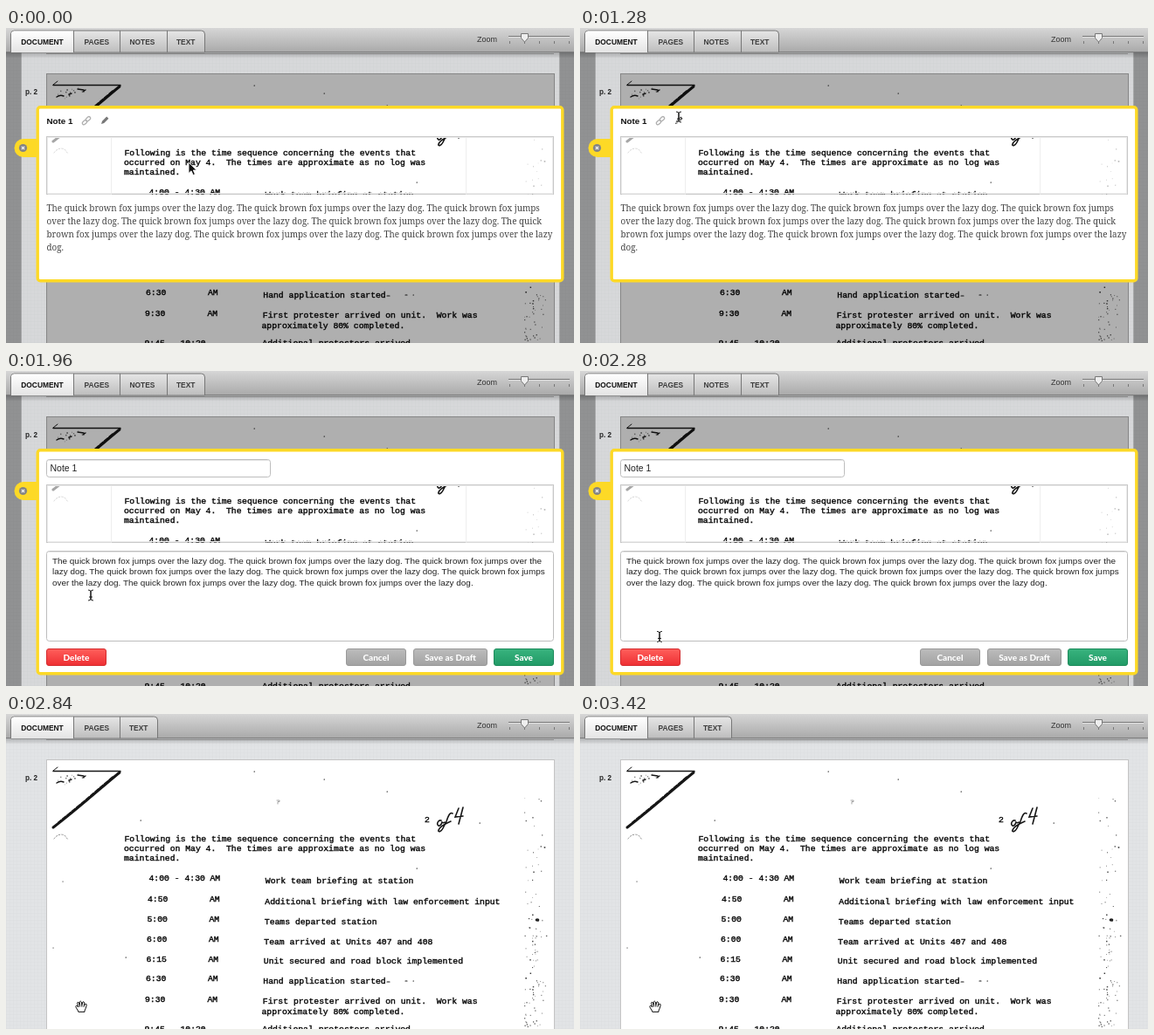
Animation, 650 px wide and 361 px high, one loop 3.44 s. Source, as an HTML page:

```html
<!DOCTYPE html>
<html lang="en">
<head>
<meta charset="utf-8">
<title>Note editor</title>
<style>
html, body { margin: 0; width: 100%; height: 100%; overflow: hidden; background: #e2e4e6; }
svg { display: block; width: 650px; height: 361px; }
text { white-space: pre; font-family: "Liberation Sans", Arial, sans-serif; }
.type text { font: 9.75px "Liberation Mono", monospace; fill: #0c0c0c; stroke: #0c0c0c; stroke-width: .42px; }
.tab { font-size: 8.4px; font-weight: 700; fill: #3c3c3c; }
.serif text { font: 9.9px "Noto Serif", serif; fill: #444; }
.field text { font-size: 9.93px; fill: #222; }
.btn text { font: 800 10px Lato, sans-serif; fill: #fff; text-anchor: middle; }
</style>
</head>
<body>
<svg id="stage" viewBox="0 0 650 361" xmlns="http://www.w3.org/2000/svg">
  <defs>
    <linearGradient id="bar" x2="0" y2="1"><stop stop-color="#d6d6d6"/><stop offset="1" stop-color="#a9a9a9"/></linearGradient>
    <linearGradient id="tabOff" x2="0" y2="1"><stop stop-color="#e6e6e6"/><stop offset="1" stop-color="#bdbdbd"/></linearGradient>
    <linearGradient id="tabOn" x2="0" y2="1"><stop stop-color="#fff"/><stop offset="1" stop-color="#e4e4e4"/></linearGradient>
    <linearGradient id="fall" x2="0" y2="1"><stop stop-color="#000" stop-opacity=".22"/><stop offset="1" stop-color="#000" stop-opacity="0"/></linearGradient>
    <linearGradient id="red" x2="0" y2="1"><stop stop-color="#ff5f5b"/><stop offset="1" stop-color="#ee2f33"/></linearGradient>
    <linearGradient id="grey" x2="0" y2="1"><stop stop-color="#bcbcbc"/><stop offset="1" stop-color="#a2a2a2"/></linearGradient>
    <linearGradient id="green" x2="0" y2="1"><stop stop-color="#38b37e"/><stop offset="1" stop-color="#219a66"/></linearGradient>
    <pattern id="linen" width="4" height="4" patternUnits="userSpaceOnUse"><path d="M0 .5H4M.5 0V4" stroke="#000" stroke-opacity=".012"/></pattern>
    <clipPath id="crop"><rect x="48" y="126" width="578" height="64.5"/></clipPath>
    <g id="ink">
      <g fill="none" stroke="#161616" stroke-linecap="round">
        <path d="M54 65.5H131" stroke-width="1.4"/>
        <path d="M130 67C108 85 84 107 54 130" stroke-width="3"/>
        <path d="M122 72C100 91 80 108 60 124" stroke-width="1.6" stroke-dasharray="5 2"/>
        <path d="M54 65l5-4" stroke-width="1"/>
        <path d="M58 79q4-3 8-1M82 70l7 1M72 76l3-1M88 73l3-2" stroke-width="1.4"/>
        <path d="M55 143q5-7 12-4l4 5" stroke="#777" stroke-width=".8" stroke-dasharray="1.5 2"/>
        <path d="M498 122c-3-1-5 3-4 5s4 1 5-3c1 1 2 1 3 0M511 114c-3-2-5 3-7 9l-4 8c-2 4-6 5-5 2 1-3 7-7 14-10M518 108l-4 10 9-1M523 107l-5 19" stroke-width="1.6"/>
        <path d="M310 99h3v1.5h-2v2.5" stroke="#999" stroke-width=".9"/>
        <path d="M284 66h.5M364 75h.5M436 307h3M457 306h2M466 306h.5M154 122h.5M436 89h.5M542 125h.5M470 177h.5M137 279h.5M65 192h.1M54 268h.1" stroke-width="1.1"/>
      </g>
      <ellipse cx="608" cy="236" rx="2.4" ry="1.7" fill="#222"/>
      <g id="specks" fill="#333"></g>
      <g id="typed" class="type"></g>
    </g>
  </defs>

  <rect width="650" height="361" fill="#e2e4e6"/>
  <rect width="650" height="361" fill="url(#linen)"/>
  <path d="M46 29.5H627" stroke="#aaa"/>
  <rect x="46.5" y="52.5" width="581" height="320" fill="#fff" stroke="#c4c4c4"/>
  <use href="#ink"/>
  <g id="dim">
    <path d="M0 28H17V361H0ZM634 28H650V361H634Z" fill="#000" fill-opacity=".36"/>
    <path d="M17 28H634V361H17Z" fill="#000" fill-opacity=".05"/>
    <rect x="46" y="52" width="582" height="310" fill="#000" fill-opacity=".28"/>
    <path d="M17.5 28V361M633.5 28V361" stroke="#777" stroke-opacity=".5"/>
  </g>
  <text x="22" y="76" font-size="8.2" font-weight="700" fill="#222">p. 2</text>

  <rect y="28" width="650" height="7" fill="url(#fall)"/>
  <rect width="650" height="28" fill="url(#bar)"/>
  <path d="M0 27.5H650" stroke="#7d7d7d"/>
  <g id="tabs"></g>
  <text x="539" y="16" font-size="9" fill="#333">Zoom</text>
  <path d="M575 9.5H645" stroke="#777"/>
  <path d="M575 10.5H645" stroke="#e2e2e2"/>
  <path d="M576.5 15v3M593.5 15v3M610.5 15v3M627.5 15v3M644.5 15v3" stroke="#777"/>
  <path d="M589.5 6.5h8v5l-4 4.5-4-4.5Z" fill="#eee" stroke="#777"/>

  <g id="note">
    <path d="M36 127H20a10.5 10.5 0 0 0 0 21H36Z" fill="#fdd926"/>
    <circle cx="19.5" cy="137.5" r="4.6" fill="#858585"/>
    <path d="M17.8 135.8l3.4 3.4M21.2 135.8l-3.4 3.4" stroke="#fff" stroke-width="1.1"/>
    <rect id="frame" x="36.2" y="90.8" width="600.6" height="199" rx="3" fill="#fff" stroke="#fdd926" stroke-width="3.4"/>
    <g id="excerpt">
      <rect x="46.5" y="124.5" width="580" height="66" fill="#fff" stroke="#c8c8c8"/>
      <g clip-path="url(#crop)">
        <use href="#ink"/>
        <path d="M48 126H121V191H48ZM526 126H626V191H526Z" fill="#fff" fill-opacity=".62"/>
        <path d="M120.5 126V191M526.5 126V191" stroke="#eee"/>
      </g>
      <rect x="47.5" y="125.5" width="578" height="64" fill="none" stroke="#ececec"/>
    </g>
    <g id="view">
      <text x="46.5" y="110" font-size="9.8" font-weight="700" fill="#111">Note 1</text>
      <g fill="none" stroke="#b0b0b0" stroke-width="1.3">
        <rect x="-3" y="-1.8" width="6" height="3.6" rx="1.8" transform="translate(90 108.2) rotate(-42)"/>
        <rect x="-3" y="-1.8" width="6" height="3.6" rx="1.8" transform="translate(94 104.2) rotate(-42)"/>
      </g>
      <path id="pencil" d="M109 110l1-3.2 5.2-5.2 2.2 2.2-5.2 5.2Z"/>
      <g id="body" class="serif"></g>
    </g>
    <g id="edit">
      <g fill="#fff" stroke="#bdbdbd">
        <rect x="46.5" y="101.5" width="256" height="20" rx="3"/>
        <rect x="46.5" y="206.5" width="580" height="103" rx="3"/>
      </g>
      <path d="M48 102.5H301M48 207.5H625" stroke="#e6e6e6"/>
      <text x="50.5" y="115" font-size="10.5" fill="#222">Note 1</text>
      <g id="area" class="field"></g>
      <path id="caret" d="M537.5 237V248" stroke="#111"/>
      <g id="buttons" class="btn"></g>
    </g>
  </g>

  <g id="cursor" stroke-linejoin="round">
    <path id="arrow" d="M0 0V12.5L3 9.8 5.2 14.6 7.4 13.6 5.3 9H9.3Z" fill="#111" stroke="#fff" stroke-width=".9"/>
    <g id="beam" fill="none" stroke-linecap="round">
      <path d="M-2.5-6Q0-6 0-4V4Q0 6-2.5 6M2.5-6Q0-6 0-4V4Q0 6 2.5 6M-1.5 2H1.5" stroke="#fff" stroke-width="2.4"/>
      <path d="M-2.5-6Q0-6 0-4V4Q0 6-2.5 6M2.5-6Q0-6 0-4V4Q0 6 2.5 6M-1.5 2H1.5" stroke="#111" stroke-width="1"/>
    </g>
    <path id="point" d="M-1.3.8Q0-1 1.3.8V5Q2.5 4 3.6 5.4 5 4.6 5.8 6 7.4 5.6 7.6 7.4V10Q7 12 6.2 14H-.2Q-1.6 11.4-4.4 8.8-4.6 6.4-2.6 7.2L-1.3 8.4ZM1.3 5V8M3.6 5.6V8.2M5.8 6.2V8.6" fill="#fff" stroke="#111"/>
    <path id="palm" d="M-3.6 5Q-5 3-6.2.6-6.2-1.4-4.4-.4L-3.2 1-4.5-3.6Q-4.2-5.4-2.8-4.4L-1.6-1.2-1.8-5Q-.6-6.8.4-5L.8-1.2 1.8-4.8Q3.2-6 3.9-4.2L3.3-.6 4.8-2.6Q6.4-3.2 6.2-1.2 5.4 2.4 4 5V6.4H-3.2ZM-1.6-1.2V.6M.8-1.2V.6M3.3-.6L3 .8" fill="#fff" stroke="#111"/>
  </g>
</svg>
<script>
const NS = "http://www.w3.org/2000/svg";
const $ = id => document.getElementById(id);
const LOOP = 3440, OPEN = 1300, REMOVE = 2740;

function add(parent, tag, attrs, label) {
  const el = document.createElementNS(NS, tag);
  for (const k in attrs) el.setAttribute(k, attrs[k]);
  if (label) el.textContent = label;
  return parent.appendChild(el);
}
const show = (id, on) => $(id).setAttribute("visibility", on ? "inherit" : "hidden");

// Typewritten page
const typed = (x, y, s) => add($("typed"), "text", { x, y }, s);
typed(135.5, 145.5, "Following is the time sequence concerning the events that");
typed(135, 157, "occurred on May 4.  The times are approximate as no log was");
typed(135, 167.5, "maintained.");
typed(479, 124, "2");
[
  [163.5, 191, "4:00 - 4:30", "Work team briefing at station"],
  [162, 215, "4:50", "Additional briefing with law enforcement input"],
  [161.5, 238, "5:00", "Teams departed station"],
  [161, 261, "6:00", "Team arrived at Units 407 and 408"],
  [160.5, 283.5, "6:15", "Unit secured and road block implemented"],
  [160, 306, "6:30", "Hand application started"],
  [159, 329.5, "9:30", "First protester arrived on unit.  Work was"],
  [158.5, 363.5, "9:45 - 10:20", "Additional protesters arrived"]
].forEach(([x, y, time, what], i) => {
  typed(x, y, time);
  if (i < 7) typed(233.5 - i * .5, y, "AM");
  typed(296.8 - i * .5, y + (i < 7 ? 2.6 : 0), what);
});
typed(292.5, 343.5, "approximately 80% completed.");

// Copier specks, mostly down the right margin
let seed = 11;
const rnd = () => (seed = seed * 16807 % 2147483647) / 2147483647;
for (let i = 0; i < 120; i++) {
  const side = rnd() < .85;
  const x = side ? (rnd() < .5 ? 593 : 602) + rnd() ** 2 * 16 : 56 + rnd() * 34;
  const y = side ? 58 + Math.sqrt(rnd()) * 300 : 68 + rnd() * 14;
  const w = .6 + rnd();
  add($("specks"), "rect", { x, y, width: w, height: w, opacity: .5 + rnd() * .5 });
}

// Tab strip, rebuilt only when the set of tabs changes
let tabKey;
function drawTabs(full) {
  if (tabKey === full) return;
  tabKey = full;
  const box = $("tabs");
  box.textContent = "";
  const list = [["DOCUMENT", 72, 11.8], ["PAGES", 53, 12], ["NOTES", 54, 11], ["TEXT", 43, 10.5]]
    .filter(t => full || t[0] !== "NOTES");
  const width = list.reduce((n, t) => n + t[1], 0), end = 5.5 + width;
  add(box, "path", { d: `M5.5 28V7q0-4 4-4H${end - 4}q4 0 4 4V28Z`, fill: "url(#tabOff)", stroke: "#777" });
  add(box, "path", { d: "M6 28V7q0-3.5 3.5-3.5H77V28Z", fill: "url(#tabOn)" });
  let x = 5.5;
  list.forEach(([name, w, pad], i) => {
    if (i) add(box, "path", { d: `M${x} 3V28`, stroke: "#777" });
    const label = add(box, "text", { x: x + pad, y: 18.5, class: "tab" }, name);
    if (!i) label.style.fill = "#111";
    x += w;
  });
}

// Note copy
const words = Array(8).fill("The quick brown fox jumps over the lazy dog.").join(" ").split(" ");
function copy(id, x, y, lead, breaks) {
  let from = 0;
  [...breaks, words.length].forEach((to, i) => {
    add($(id), "text", { x, y: y + i * lead }, words.slice(from, to).join(" "));
    from = to;
  });
}
copy("body", 46.5, 210, 15, [23, 47, 71]);
copy("area", 53, 220.5, 12.5, [25, 50]);

[[46, 69, "Delete", "red", "#d42b2e"], [389, 69, "Cancel", "grey", "#999"],
 [466, 85, "Save as Draft", "grey", "#999"], [558, 69, "Save", "green", "#1d8a5b"]]
  .forEach(([x, w, label, fill, stroke]) => {
    add($("buttons"), "rect", { x: x + .5, y: 318.5, width: w - 1, height: 19, rx: 2.5, fill: `url(#${fill})`, stroke });
    add($("buttons"), "text", { x: x + w / 2, y: 331.5 }, label);
  });

// Pointer path: time, x, y
const path = [[0, 209, 154], [40, 209, 154], [420, 112, 98], [520, 113, 101], [1320, 113, 102],
  [1960, 97, 257], [2020, 97, 257], [2480, 87, 336], [2740, 87, 336], [2760, 86, 335], [LOOP, 86, 335]];
function pointer(t) {
  const i = path.findIndex(p => p[0] > t);
  const a = path[i - 1], b = path[i];
  let k = (t - a[0]) / (b[0] - a[0]);
  k = k * k * (3 - 2 * k);
  return [a[1] + (b[1] - a[1]) * k, a[2] + (b[2] - a[2]) * k];
}

function shape(t, y) {
  if (t >= REMOVE) return "palm";
  if (t < OPEN) return t < 480 ? "arrow" : t < 1240 ? "point" : "beam";
  if (y > 318) return "point";
  return y < 121 || (y > 206 && y < 309) ? "beam" : "arrow";
}

function draw(t) {
  const open = t < REMOVE, editing = open && t >= OPEN;
  drawTabs(open);
  show("dim", open);
  show("note", open);
  show("view", open && !editing);
  show("edit", editing);
  show("caret", editing && (t < 1800 || t >= 2300));
  $("frame").setAttribute("height", editing ? 256 : 199);
  $("excerpt").setAttribute("transform", `translate(0 ${editing ? 6 : 0})`);
  $("pencil").setAttribute("fill", t >= 480 ? "#111" : "#777");
  const [x, y] = pointer(t), kind = shape(t, y);
  $("cursor").setAttribute("transform", `translate(${x.toFixed(2)} ${y.toFixed(2)})`);
  for (const id of ["arrow", "beam", "point", "palm"]) show(id, id === kind);
}

const start = performance.now();
function tick(now) {
  draw(Math.max(0, now - start) % LOOP);
  requestAnimationFrame(tick);
}
draw(0);
requestAnimationFrame(tick);
</script>
</body>
</html>
```
